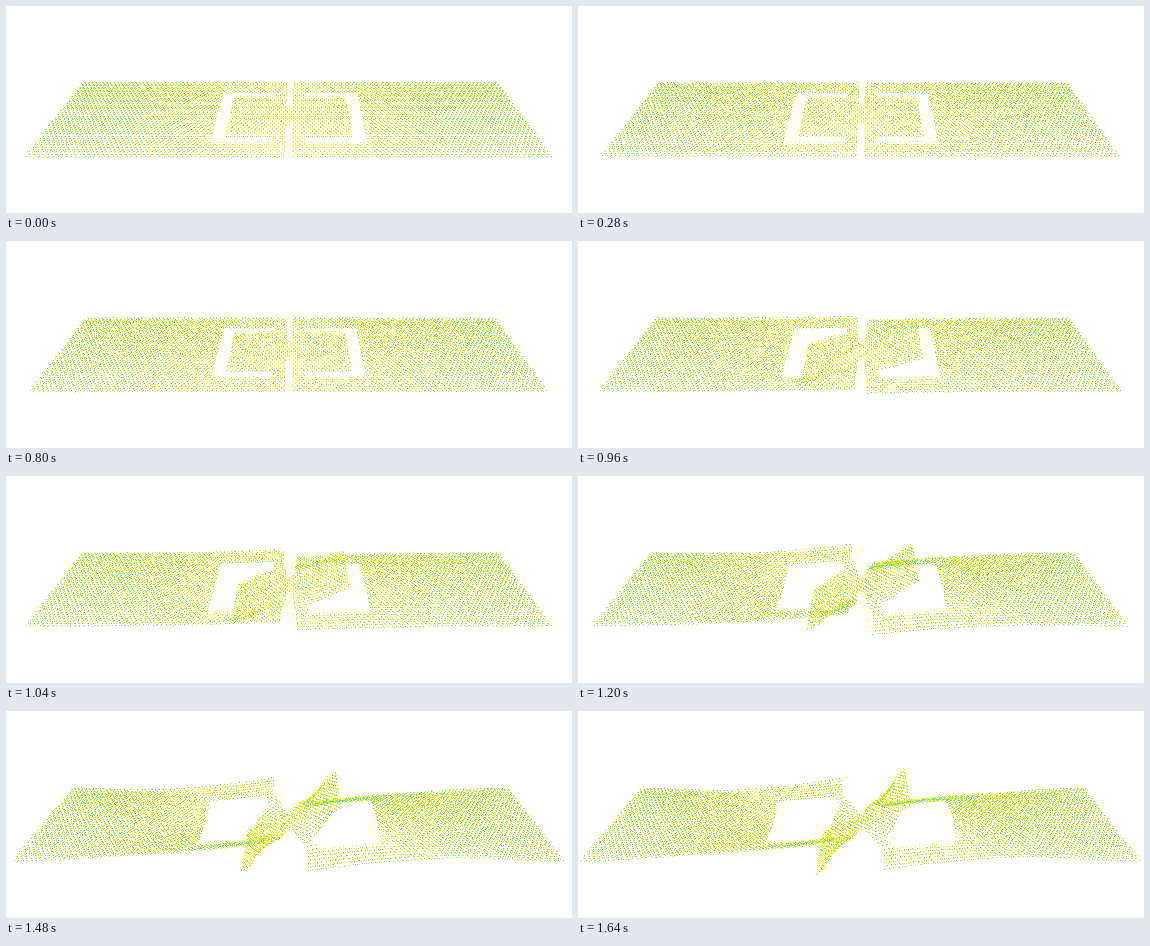
A matplotlib script for the animation above (1680 ms loop, 566x207 px).

```python
import numpy as np
import matplotlib.pyplot as plt
from matplotlib.animation import FuncAnimation

WIDTH, HEIGHT, DPI = 566, 207, 64   # power of two keeps the size exact
FRAMES, STEP = 42, 40          # 42 * 40 ms = one loop
PULL_START = 880               # ms

YELLOW, CYAN = "#f6f000", "#4cd4f4"

# Camera: tilted perspective view of the sheet
TILT = np.radians(32)
DIST = 488
CX, CY = 283, 110

# Sheet and cut dimensions, measured from its centre
HALF_X, HALF_Y = 228, 69
FLAP_X, FLAP_Y = 60, 36
HOLE_X, HOLE_Y = 72, 47
NECK = 16
SLIT_X, SLIT_Y = 2.4, 14
BOND = 4.0
LAYER = 1.6


def lattice(shift):
    """Triangular lattice with the cuts taken out."""
    row = BOND * np.sqrt(3) / 2
    i, j = np.meshgrid(np.arange(-60, 61), np.arange(-24, 25))
    x = (i + 0.5 * (j % 2)) * BOND
    y = j * row + shift
    ax, ay = abs(x), abs(y)
    inside = (ax <= HALF_X) & (ay <= HALF_Y)
    hole = (ax < HOLE_X) & (ay < HOLE_Y)
    flap = (ax < FLAP_X) & (ay < FLAP_Y)
    neck = ax < NECK
    slit = (ax < SLIT_X) & (ay > SLIT_Y)
    keep = inside & ~(hole & ~flap & ~neck) & ~slit
    return x[keep], y[keep]


def smooth(u):
    u = np.clip(u, 0, 1)
    return u * u * (3 - 2 * u)


def deform(x, y, t):
    """Relax, then pull the two halves apart while the middle turns."""
    pull = max(t - PULL_START, 0)
    stretch = 0.0243 * pull
    turn = np.radians(1.56) * np.sqrt(pull)
    knots = [0, 160, 240, 480, 760]
    lift = np.interp(pull, knots, [0, 5, 10, 18, 17.5])
    shrink = np.interp(pull, knots, [0, 0.5, 1.5, 6, 9])

    side, ax, ay = np.sign(x), abs(x), abs(y)

    # outer halves: slide apart, bend towards the middle, narrow
    bend = np.clip((190 - ax) / 187, 0, 1) ** 2
    curl = 1 + np.clip(ax / 80, 0, 1)
    xb = x + side * stretch
    yb = y * (1 - shrink * smooth((HALF_X - ax) / 110) / HALF_Y)
    zb = -side * lift * bend * (1 - curl * (1 - (ay / HALF_Y) ** 2))

    # middle flap: turns about the depth axis
    xf, zf = x * np.cos(turn), x * np.sin(turn)

    link = np.clip((ay - 8) / (HOLE_Y - 8), 0, 1) ** 2
    link = link * np.clip(1 - (ax - NECK) / 30, 0, 1)
    w = np.where((ay > HOLE_Y) | (ax > FLAP_X), 1, link)

    grow = 1 + 0.016 * np.exp(-t / 60)
    mix = lambda body, flap: grow * (w * body + (1 - w) * flap)
    return mix(xb, xf), mix(yb, y), mix(zb, zf)


def project(x, y, z):
    up = y * np.sin(TILT) + z * np.cos(TILT)
    scale = 1 / (1 + (y * np.cos(TILT) - z * np.sin(TILT)) / DIST)
    return CX + x * scale + 0.027 * up, CY - up * scale


fig = plt.figure(figsize=(WIDTH / DPI, HEIGHT / DPI), dpi=DPI, facecolor="white")
ax = fig.add_axes([0, 0, 1, 1])
ax.set(xlim=(0, WIDTH), ylim=(HEIGHT, 0))
ax.axis("off")

outer, inner = lattice(0), lattice(BOND / np.sqrt(3))
layers = []
for sites, height, color in ((outer, -LAYER, YELLOW),
                             (inner, 0, CYAN),
                             (outer, LAYER, YELLOW)):
    dots, = ax.plot([], [], ",", color=color, antialiased=False)
    layers.append((sites, height, dots))


def update(i):
    rng = np.random.default_rng(i)
    heat = 0.2 if i else 0
    for (x, y), height, dots in layers:
        px, py, pz = deform(x, y, i * STEP)
        noise = rng.normal(0, 1, (3, x.size)) * heat
        dots.set_data(*project(px + noise[0], py + noise[1],
                               pz + height + noise[2]))
    return [dots for _, _, dots in layers]


anim = FuncAnimation(fig, update, frames=FRAMES, interval=STEP,
                     repeat=True, repeat_delay=0, blit=False)
plt.show()
```
